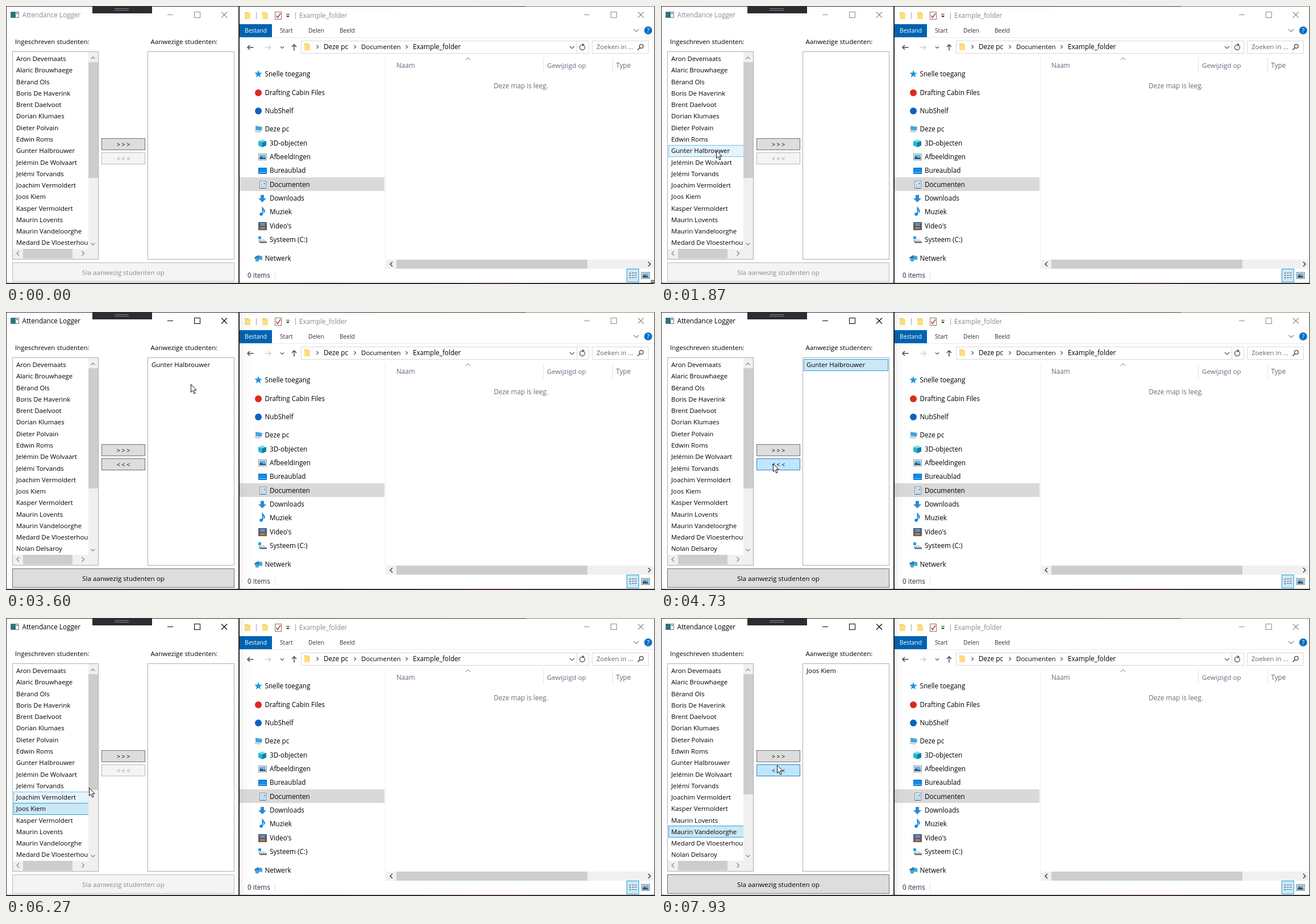
Write an HTML page with a canvas that moves like this. It is 1142 px wide and 490 px high and loops after 8 s.

```html
<!DOCTYPE html>
<html lang="nl">
<head>
<meta charset="utf-8">
<title>Attendance Logger</title>
<style>
html, body { margin: 0; width: 100%; height: 100%; overflow: hidden; background: #2a2a2c; }
canvas { display: block; }
</style>
</head>
<body>
<canvas id="stage" width="1142" height="490"></canvas>
<script>
const ctx = document.getElementById('stage').getContext('2d');
const LOOP = 8000, STEP = 200 / 3, ROW = 20.28;
const FONT = '"Open Sans", "Noto Sans", sans-serif';

const students = [
  'Aron Devemaats', 'Alaric Brouwhaege', 'Bérand Ols', 'Boris De Haverink', 'Brent Daelvoot',
  'Dorian Klumaes', 'Dieter Polvain', 'Edwin Roms', 'Gunter Halbrouwer', 'Jelémin De Wolvaart',
  'Jelémi Torvands', 'Joachim Vermoldert', 'Joos Kiem', 'Kasper Vermoldert', 'Maurin Lovents',
  'Maurin Vandeloorghe', 'Medard De Vloesterhout', 'Nolan Delsaroy'
];

// Pointer path: step, x, y
const path = [
  [16, 176, 456], [17, 151, 400], [18, 126, 345], [19, 111, 308], [20, 103, 282], [22, 97, 258],
  [23, 97, 256], [27, 97, 255], [28, 97, 254], [36, 97, 254], [37, 118, 252], [38, 152, 248],
  [39, 190, 244], [40, 200, 242], [49, 200, 242], [51, 245, 206], [54, 325, 127], [58, 329, 93],
  [60, 329, 91], [63, 318, 112], [70, 199, 265], [71, 197, 267], [84, 197, 267], [86, 176, 284],
  [88, 118, 320], [90, 88, 331], [92, 98, 328], [93, 128, 311], [94, 146, 299], [97, 204, 243],
  [102, 204, 243], [106, 150, 300], [107, 110, 318], [110, 100, 369], [114, 100, 369],
  [116, 140, 322], [118, 196, 266], [119, 204, 259]
];

function pointer(n) {
  if (n < path[0][0]) return null;
  const k = path.findIndex(p => p[0] > n);
  if (k < 0) return path[path.length - 1].slice(1);
  const [a, x, y] = path[k - 1], [b, u, v] = path[k];
  const f = (n - a) / (b - a);
  return [Math.round(x + (u - x) * f), Math.round(y + (v - y) * f)];
}

function rect(x, y, w, h, fill, stroke) {
  if (fill) { ctx.fillStyle = fill; ctx.fillRect(x, y, w, h); }
  if (stroke) {
    ctx.strokeStyle = stroke; ctx.lineWidth = 1;
    ctx.strokeRect(x + .5, y + .5, w - 1, h - 1);
  }
}
function text(s, x, y, size = 11.8, color = '#000', align = 'left') {
  ctx.font = size + 'px ' + FONT;
  ctx.fillStyle = color;
  ctx.textAlign = align;
  ctx.fillText(s, x, y);
}
function trace(points) {
  ctx.beginPath();
  for (let i = 0; i < points.length; i += 2) ctx.lineTo(points[i], points[i + 1]);
}
function line(color, width, ...points) {
  trace(points);
  ctx.strokeStyle = color; ctx.lineWidth = width; ctx.stroke();
}
function poly(color, ...points) {
  trace(points);
  ctx.closePath(); ctx.fillStyle = color; ctx.fill();
}
function disc(x, y, r, color) {
  ctx.beginPath(); ctx.arc(x, y, r, 0, Math.PI * 2);
  ctx.fillStyle = color; ctx.fill();
}
function chevron(x, y, dir, size, color, width = 1.2) {
  ctx.save();
  ctx.translate(x, y);
  ctx.rotate({ right: 0, down: 1, left: 2, up: 3 }[dir] * Math.PI / 2);
  line(color, width, -size / 2, -size, size / 2, 0, -size / 2, size);
  ctx.restore();
}
function arrow(x, y, angle, color) {
  ctx.save();
  ctx.translate(x, y); ctx.rotate(angle);
  line(color, 1.5, -5.5, 0, 5, 0);
  line(color, 1.5, 1, -4, 5, 0, 1, 4);
  ctx.restore();
}
function folder(x, y) {
  poly('#e8b93f', x - 5, y - 6, x + 1, y - 6, x + 3, y - 4, x + 5, y - 4, x + 5, y + 6, x - 5, y + 6);
  poly('#ffdd7e', x - 3, y - 6, x + 5, y - 3, x + 5, y + 6, x - 5, y + 6, x - 5, y - 3);
}
function caption(xs, color) {
  const [a, b, c] = xs;
  line(color, 1, a - 5, 15.5, a + 5, 15.5);
  rect(b - 5, 10, 11, 11, null, color);
  line(color, 1.1, c - 5, 10.5, c + 5, 20.5);
  line(color, 1.1, c + 5, 10.5, c - 5, 20.5);
}

const icons = {
  star(x, y) {
    const p = [];
    for (let i = 0; i < 10; i++) {
      const a = -Math.PI / 2 + i * Math.PI / 5, r = i % 2 ? 3 : 7;
      p.push(x + r * Math.cos(a), y + r * Math.sin(a));
    }
    poly('#1e94e4', ...p);
  },
  red(x, y) { disc(x, y, 6, '#da2a20'); },
  blue(x, y) { disc(x, y, 6, '#0a64c0'); },
  pc(x, y) {
    poly('#8ba0b0', x - 5, y - 6, x + 7, y - 4, x + 6, y + 3, x - 5, y + 2);
    poly('#2faaf0', x - 4, y - 5, x + 6, y - 3, x + 5, y + 2, x - 4, y + 1);
    poly('#b9c4cc', x - 7, y + 3, x + 5, y + 4, x + 3, y + 6, x - 6, y + 5);
  },
  cube(x, y) {
    poly('#7fdcea', x, y - 7, x + 7, y - 4, x, y - 2, x - 7, y - 4);
    poly('#29b4cf', x - 7, y - 4, x, y - 2, x, y + 7, x - 7, y + 4);
    poly('#0d7fa6', x + 7, y - 4, x, y - 2, x, y + 7, x + 7, y + 4);
  },
  picture(x, y) {
    rect(x - 7, y - 6, 15, 12, '#fff', '#8a959d');
    rect(x - 5, y - 4, 11, 8, '#69b5ea');
    poly('#2c5673', x - 5, y + 4, x - 5, y + 1, x - 2, y - 1, x + 2, y + 2, x + 6, y + 1, x + 6, y + 4);
  },
  desktop(x, y) {
    rect(x - 7, y - 5, 15, 11, '#0b8df0', '#0869b5');
    rect(x - 6, y + 3, 13, 1, '#79c6ff');
  },
  doc(x, y) {
    rect(x - 5, y - 7, 12, 14, '#f8fafb', '#7d8c96');
    for (let i = 0; i < 4; i++) rect(x - 3, y - 4 + i * 3, i < 2 ? 4 : 8, 1, '#4a97c8');
    rect(x + 2, y - 4, 3, 4, '#67b6df');
  },
  down(x, y) {
    poly('#2c8bd6', x - 3, y - 6, x + 3, y - 6, x + 3, y, x + 7, y, x, y + 7, x - 7, y, x - 3, y);
  },
  note(x, y) {
    disc(x - 2, y + 4, 2.8, '#1686df');
    line('#1686df', 2, x + .5, y + 4, x + .5, y - 7, x + 4, y - 2, x + 3, y + 1);
  },
  film(x, y) {
    rect(x - 7, y - 7, 15, 14, '#333840');
    rect(x - 4, y - 6, 9, 6, '#5d8fd0');
    rect(x - 4, y + 1, 9, 5, '#b57850');
    for (let i = 0; i < 4; i++) {
      rect(x - 6, y - 6 + i * 3.4, 1, 2, '#ddd');
      rect(x + 6, y - 6 + i * 3.4, 1, 2, '#ddd');
    }
  },
  drive(x, y) {
    poly('#d4d8da', x - 6, y, x + 3, y - 1, x + 8, y + 3, x - 4, y + 3);
    poly('#767d82', x - 6, y, x - 4, y + 3, x + 8, y + 3, x + 8, y + 6, x - 4, y + 6, x - 6, y + 3);
    rect(x - 7, y - 6, 5, 5, '#20a3e8');
  },
  network(x, y) {
    poly('#3da7e2', x - 2, y - 6, x + 7, y - 4, x + 7, y + 3, x - 1, y + 1);
    poly('#176ba5', x - 7, y - 2, x - 1, y - 5, x + 2, y + 1, x - 3, y + 5);
    disc(x - 2, y + 2, 3.5, '#4aa4cf');
  }
};

// Icon, label, y, and whether the entry is indented
const places = [
  ['star', 'Snelle toegang', 120], ['red', 'Drafting Cabin Files', 152.5], ['blue', 'NubShelf', 185],
  ['pc', 'Deze pc', 217], ['cube', '3D-objecten', 241.5, 1], ['picture', 'Afbeeldingen', 266, 1],
  ['desktop', 'Bureaublad', 290, 1], ['doc', 'Documenten', 314.5, 1], ['down', 'Downloads', 339, 1],
  ['note', 'Muziek', 363, 1], ['film', "Video's", 387.5, 1], ['drive', 'Systeem (C:)', 412, 1],
  ['network', 'Netwerk', 444.5]
];

function explorer() {
  rect(411, 1, 730, 487, '#fff');
  folder(425, 17); folder(456, 17);
  rect(440, 11, 1, 12, '#a0a0a0');
  rect(473, 10, 12, 14, '#fff', '#777');
  line('#d8452c', 1.8, 475.5, 17, 478, 20.5, 483, 13);
  rect(493, 14, 6, 1, '#222');
  poly('#222', 493, 17, 499, 17, 496, 20);
  rect(509, 11, 1, 12, '#a0a0a0');
  text('Example_folder', 516, 21, 11.7, '#8b8b8b');
  caption([1022, 1069, 1117], '#8c8c8c');

  rect(411, 32, 57, 23, '#0063b1');
  text('Bestand', 439.5, 47, 10.2, '#fff', 'center');
  text('Start', 482, 47, 10.2, '#333');
  text('Delen', 532, 47, 10.2, '#333');
  text('Beeld', 587, 47, 10.2, '#333');
  chevron(1109, 43, 'down', 4.5, '#888');
  disc(1130, 43, 7, '#0a6fc4');
  text('?', 1130, 47, 10.5, '#fff', 'center');
  rect(411, 55, 730, 1, '#eaeaea');

  arrow(430, 73, Math.PI, '#444');
  arrow(461, 73, 0, '#cfcfcf');
  chevron(486, 73, 'down', 3, '#555');
  arrow(507, 73, -Math.PI / 2, '#444');
  rect(519, 61, 507, 23, '#fff', '#d9d9d9');
  folder(530, 72);
  [548, 614, 705].forEach(x => chevron(x, 72, 'right', 3, '#555'));
  text('Deze pc', 559, 76);
  text('Documenten', 625, 76, 11.5);
  text('Example_folder', 716, 76, 11.7);
  chevron(996, 73, 'down', 4, '#555');
  rect(1004, 62, 1, 21, '#d9d9d9');
  ctx.beginPath(); ctx.arc(1014, 73, 4.5, -.6, 4.6);
  ctx.strokeStyle = '#555'; ctx.lineWidth = 1.3; ctx.stroke();
  poly('#555', 1014, 65.5, 1018.5, 69, 1014, 71);
  rect(1031, 61, 100, 23, '#fff', '#d9d9d9');
  text('Zoeken in ...', 1039, 76, 11.6, '#666');
  ctx.beginPath(); ctx.arc(1118, 71, 3.4, 0, 7);
  ctx.strokeStyle = '#444'; ctx.lineWidth = 1.3; ctx.stroke();
  line('#444', 1.6, 1115.5, 73.5, 1111.5, 77.5);

  rect(411, 302, 255, 24, '#d9d9d9');
  for (const [icon, label, y, child] of places) {
    icons[icon](child ? 451 : 444, Math.round(y));
    text(label, child ? 464 : 455.5, y + 4, 11.7);
  }
  rect(667, 91, 1, 372, '#ededed');
  rect(945, 91, 1, 26, '#e3e3e3');
  rect(1067, 91, 1, 26, '#e3e3e3');
  chevron(813, 93, 'up', 4, '#777', 1);
  text('Naam', 687, 108.5, 11.7, '#5b6a7d');
  text('Gewijzigd op', 952, 108.5, 11.6, '#5b6a7d');
  text('Type', 1073.5, 108.5, 11.7, '#5b6a7d');
  text('Deze map is leeg.', 906, 145, 11.8, '#6d6d6d', 'center');

  rect(669, 447, 472, 16, '#f0f0f0');
  rect(687, 447, 336, 16, '#cdcdcd');
  chevron(678, 455, 'left', 4, '#404040', 1.5);
  chevron(1132, 455, 'right', 4, '#404040', 1.5);
  text('0 items', 425, 479, 11.7, '#1d2c44');
  rect(473, 468, 1, 14, '#e2e2e2');
  rect(1092, 463, 22, 24, '#cbe8f8', '#2f9fd8');
  for (let i = 0; i < 3; i++) {
    rect(1097, 470 + i * 4, 2, 2, '#667');
    rect(1101, 470 + i * 4, 4, 1, '#667');
    rect(1106, 470 + i * 4, 4, 1, '#667');
  }
  rect(1118, 469, 15, 12, '#fff', '#777');
  rect(1120, 471, 11, 8, '#6fb4e4');
  poly('#31566f', 1120, 479, 1120, 476, 1124, 474, 1131, 478, 1131, 479);
}

function button(label, x, y, w, h, size, look) {
  const [fill, edge, ink] = {
    off: ['#f4f4f4', '#b5b9bc', '#8a8a8a'],
    on: ['#dddddd', '#707070', '#000'],
    hot: ['#bee6fd', '#3c7fb1', '#000'],
    down: ['#c4e5f6', '#2c628b', '#000']
  }[look];
  rect(x, y, w, h, fill, edge);
  text(label, x + w / 2, y + h / 2 + 4.5, size, ink, 'center');
}

function rows(names, x, w, hovered, selected) {
  names.forEach((name, i) => {
    const y = Math.floor(83 + ROW * i);
    if (name === selected) rect(x, y, w, 21, '#cbe8f6', '#26a0da');
    else if (i === hovered) rect(x, y, w, 21, '#e5f3fb', '#70c0e7');
    text(name, x + 5, Math.round(97 + ROW * i), 11.4);
  });
}

function hit(p, x, y, w, h) {
  return !!p && p[0] >= x && p[0] < x + w && p[1] >= y && p[1] < y + h;
}
const during = (n, a, b) => n >= a && n < b;

function logger(n) {
  const active = n >= 34;
  const moved = during(n, 44, 76) ? students[8] : n >= 100 ? students[12] : null;
  const left = students.filter(s => s !== moved);
  const right = moved ? [moved] : [];
  const picked = during(n, 35, 44) ? students[8]
    : during(n, 91, 100) ? students[12]
    : n >= 113 ? students[15] : null;

  // Hover feedback trails the pointer by one step
  const p = pointer(n - 1);
  const rowAt = p ? Math.floor((p[1] - 83) / ROW) : -1;
  const leftHover = hit(p, 13, 83, 132, 345) ? rowAt : -1;
  const rightHover = hit(p, 251, 83, 149, 360) ? rowAt : -1;
  const barHot = hit(p, 145, 81, 17, 347);

  if (active) {
    const shade = ctx.createLinearGradient(409, 0, 433, 0);
    shade.addColorStop(0, 'rgba(0,0,0,.07)');
    shade.addColorStop(.4, 'rgba(0,0,0,.02)');
    shade.addColorStop(1, 'rgba(0,0,0,0)');
    rect(409, 0, 24, 490, shade);
  }
  rect(1, 1, 408, 487, '#fff');
  rect(8, 10, 15, 11, '#fff', '#777');
  rect(9, 11, 8, 9, '#25757e');
  rect(18, 12, 3, 2, '#2f8ad0');
  text('Attendance Logger', 28.5, 20, 11.7, active ? '#000' : '#8b8b8b');
  caption([289, 336, 384], active ? '#000' : '#8c8c8c');
  rect(152, 0, 105, 13, '#2d2d30');
  rect(191, 4, 25, 1, '#85858a');
  rect(191, 7, 25, 1, '#85858a');

  text('Ingeschreven studenten:', 16, 67, 11.4);
  text('Aanwezige studenten:', 254.5, 67, 11.5);

  // Rows run on beneath the scrollbar
  rect(11, 80, 152, 367, '#fff', '#abadb3');
  ctx.save();
  ctx.beginPath(); ctx.rect(12, 81, 133, 347); ctx.clip();
  rows(left, 13, 150, leftHover, picked);
  ctx.restore();

  rect(145, 81, 17, 365, '#f0f0f0');
  rect(12, 428, 133, 18, '#f0f0f0');
  rect(145, 99, 17, moved ? 212 : 204, barHot ? '#a6a6a6' : '#cdcdcd');
  rect(30, 428, 87, 17, '#cdcdcd');
  const glyph = barHot ? '#111' : '#858585';
  chevron(153, 91.5, 'up', 3.5, glyph);
  chevron(153, 419.5, 'down', 3.5, glyph);
  chevron(21, 436, 'left', 4, '#858585');
  chevron(135.5, 436, 'right', 4, '#858585');

  rect(249, 80, 153, 367, '#fff', '#abadb3');
  rows(right, 251, 149, rightHover, during(n, 61, 76) ? moved : null);

  const addDown = n === 43 || n === 99, backDown = n === 75;
  button('> > >', 168, 233, 77, 21, 10.4,
    addDown ? 'down' : hit(p, 168, 233, 77, 21) ? 'hot' : 'on');
  button('< < <', 168, 258, 77, 21, 10.4,
    !moved ? 'off' : backDown ? 'down' : hit(p, 168, 258, 77, 21) ? 'hot' : 'on');
  button('Sla aanwezig studenten op', 11, 452, 391, 34, 11.65, moved ? 'on' : 'off');
}

function drawPointer(p) {
  if (!p) return;
  ctx.save();
  ctx.translate(p[0] + .5, p[1] + .5);
  trace([0, 0, 0, 14, 3, 11, 5.3, 16.5, 7.6, 15.5, 5.3, 10.2, 9.6, 10.2]);
  ctx.closePath();
  ctx.fillStyle = '#fff'; ctx.fill();
  ctx.strokeStyle = '#111'; ctx.lineWidth = 1; ctx.stroke();
  ctx.restore();
}

function resizePointer() {
  line('#333', 3, 1137, 485, 1142, 490);
  poly('#333', 1135, 483, 1141, 483, 1135, 489);
  poly('#fff', 1136, 484, 1139, 484, 1136, 487);
  line('#fff', 1, 1137, 485, 1142, 490);
}

function draw(now) {
  const n = Math.floor((now % LOOP + 4) / STEP);
  const desk = ctx.createLinearGradient(0, 0, 1142, 0);
  desk.addColorStop(0, '#333438');
  desk.addColorStop(.5, '#242428');
  desk.addColorStop(.75, '#4a2c2e');
  desk.addColorStop(1, '#28282b');
  rect(0, 0, 1142, 490, desk);
  rect(915, 0, 227, 1, '#8a8380');
  explorer();
  logger(n);
  if (n < 6) resizePointer();
  drawPointer(pointer(n));
}

const start = performance.now();
function tick() {
  draw(performance.now() - start);
  requestAnimationFrame(tick);
}
tick();
</script>
</body>
</html>
```
